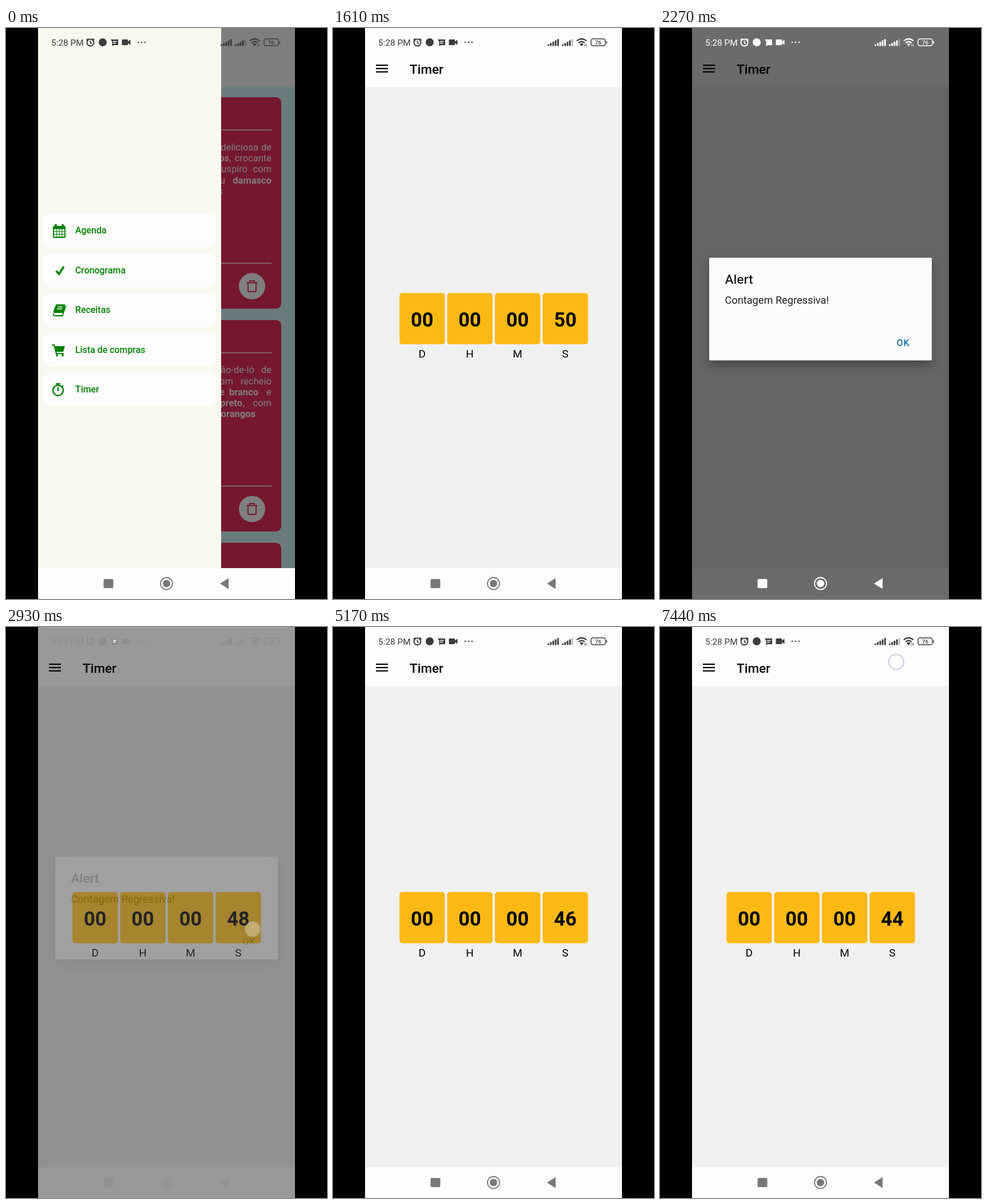
Write an HTML page that moves like this. It is 561 px wide and 998 px high and loops after 7480 ms.

```html
<!DOCTYPE html>
<html lang="pt">
<head>
<meta charset="utf-8">
<title>Timer</title>
<style>
  html, body { margin: 0; width: 100%; height: 100%; overflow: hidden; background: #000; }
  svg { display: block; width: 561px; height: 998px; font-family: Roboto, "Noto Sans", sans-serif; }
  .medium { font-weight: 500; }
  .bold { font-weight: 700; }
  .mid { text-anchor: middle; }
  .end { text-anchor: end; }
  .line { fill: none; stroke: currentColor; }
  .solid { fill: currentColor; }
</style>
</head>
<body>
<svg viewBox="0 0 561 998">
  <defs>
    <clipPath id="phone"><rect x="56" width="449" height="998"/></clipPath>
    <radialGradient id="ink" gradientUnits="userSpaceOnUse" cx="180" cy="630" r="215">
      <stop offset=".71" stop-color="#000"/>
      <stop offset="1" stop-color="#000" stop-opacity="0"/>
    </radialGradient>
    <filter id="shadow" x="-20%" y="-30%" width="140%" height="170%">
      <feDropShadow dx="0" dy="9" stdDeviation="10" flood-opacity=".3"/>
    </filter>
  </defs>
  <g clip-path="url(#phone)">
    <g id="recipes"></g>
    <g id="timer"></g>
    <rect id="scrim" x="56" width="449" height="944"/>
    <g id="drawer"></g>
    <rect x="56" y="944" width="449" height="54" fill="#fdfdfd"/>
    <rect id="dim" x="56" width="449" height="998"/>
    <g id="alert"></g>
    <g id="status"></g>
    <g id="nav"></g>
    <circle id="touch" r="13" fill="#fff" fill-opacity=".72" stroke="#bcc0da" stroke-width="1.6"/>
  </g>
</svg>
<script>
const LOOP = 7480;
const $ = id => document.getElementById(id);
const rect = (x, y, w, h, r, fill) =>
  `<rect x="${x}" y="${y}" width="${w}" height="${h}" rx="${r}" fill="${fill}"/>`;
const text = (x, y, size, str, cls = '', fill = '#000', extra = '') =>
  `<text x="${x}" y="${y}" font-size="${size}" class="${cls}" fill="${fill}" ${extra}>${str}</text>`;
const stroke = (d, w = 2) => `<path class="line" stroke-width="${w}" d="${d}"/>`;
const solid = d => `<path class="solid" d="${d}"/>`;

// Recipes screen
const trash = y => `<circle cx="430" cy="${y}" r="23" fill="#fff"/>
  <g color="#ec305c" transform="translate(430 ${y})">
  ${stroke('M-9.500 -6H9.500M-4 -6V-9.500H4V-6M-7 -6V8Q-7 9.500 -5.500 9.500H5.500Q7 9.500 7 8V-6')}</g>`;

const recipe = (y, lines) => rect(80, y, 401, 369.5, 9, '#ec305c') +
  rect(97, y + 56.5, 367, 1.4, 0, '#fff') + rect(97, y + 289.5, 367, 1.4, 0, '#fff') +
  lines.map((words, i) => words.map(([x, str, cls = '']) =>
    text(x, y + 93 + i * 19.2, 16.5, str, 'end ' + cls, '#fff')).join('')).join('') +
  trash(y + 330.3);

$('recipes').innerHTML = rect(56, 0, 449, 103, 0, '#fdfdfd') + rect(56, 103, 449, 841, 0, '#d6f8fb') +
  recipe(121, [
    [[441, 'deliciosa'], [464, 'de']],
    [[390, 'damascos', 'bold'], [393.5, ','], [464, 'crocante']],
    [[422, 'suspiro'], [464, 'com']],
    [[383, 'ou'], [464, 'damasco', 'bold']],
    [[379, 'frescos']]
  ]) +
  recipe(510.4, [
    [[434, 'pão-de-ló'], [464, 'de']],
    [[397, 'com'], [464, 'recheio']],
    [[382, 'chocolate', 'bold'], [441, 'branco', 'bold'], [464, 'e']],
    [[413, 'preto', 'bold'], [417, ','], [464, 'com']],
    [[436, 'morangos', 'bold']]
  ]) + recipe(899.8, []);

// Timer screen
const units = ['D', 'H', 'M', 'S'];
$('timer').innerHTML = rect(56, 0, 449, 103, 0, '#fdfdfd') + rect(56, 103, 449, 841, 0, '#f0f0f0') +
  [64, 69.8, 75.6].map(y => rect(75, y, 21, 2.2, 0, '#000')).join('') +
  text(134, 80, 22.5, 'Timer', 'medium') +
  units.map((u, i) => {
    const x = 116.2 + i * 83.4;
    return rect(x, 463.3, 79.2, 89.4, 5, '#fdb913') +
      text(x + 39.5, 522, 34.4, '00', 'mid bold', '#000', `id="count${u}"`) +
      text(x + 39.5, 575.5, 19, u, 'mid');
  }).join('');

// Drawer
const calendar = solid('M84 346H103Q104 346 104 348V365Q104 367 102 367H84Q82 367 82 365V348Q82 346 84 346Z') +
  rect(85, 342.5, 4, 7, 2, 'currentColor') + rect(97, 342.5, 4, 7, 2, 'currentColor') +
  [0, 1, 2].map(r => [0, 1, 2, 3].map(c =>
    rect(84 + c * 4.8, 351.5 + r * 4.8, 3.7, 3.7, 0, '#fff')).join('')).join('');
const icons = [
  calendar,
  stroke('M87.5 424.5L92.5 430L101 417', 3.6),
  solid('M88.5 483H102Q104 483 103.5 485L99.5 498H84Q82 498 82.5 496L86.5 485Q87 483 88.5 483Z') +
    stroke('M83 499Q82 503 85 503H98.5L104.5 486', 1.8) +
    `<path d="M90 487.500H99M89 491H98" stroke="#fff" stroke-width="1.4"/>`,
  solid('M84.5 556H103L100 566H87.5Z') + stroke('M80 554H84L88 569H101') +
    '<circle class="solid" cx="89" cy="572" r="2"/><circle class="solid" cx="99" cy="572" r="2"/>',
  '<circle class="line" cx="91" cy="633.500" r="9" stroke-width="2.4"/>' +
    stroke('M87 622H95M91 628V634.500M98 627L100 625', 2.4)
];
const labels = ['Agenda', 'Cronograma', 'Receitas', 'Lista de compras', 'Timer'];
$('drawer').innerHTML = rect(56, 0, 320, 944, 0, '#f8f8ee') +
  labels.map((label, i) => rect(65, 325.3 + i * 69.5, 302, 58, 12, '#fdfdfd') +
    text(121, 359 + i * 69.5, 15.9, label, 'medium', '#008000')).join('') +
  `<g color="#008000">${icons.join('')}</g>` +
  '<rect id="ripple" x="56" y="604" width="320" height="52" fill="url(#ink)"/>';

// Alert dialog
$('alert').innerHTML = `<g filter="url(#shadow)">${rect(86, 401.5, 389, 179.5, 2, '#fcfcfc')}</g>` +
  text(113.5, 447, 22.6, 'Alert', 'medium', '#212121') +
  text(113.5, 482, 18.2, 'Contagem Regressiva!', '', '#212121') +
  text(413.5, 555.5, 16, 'OK', 'medium', '#16719f', 'letter-spacing="1"');

// System bars
const bars = (x, strong) => [0, 1, 2, 3, 4].map(i =>
  `<rect class="solid" x="${x + i * 4.2}" y="${28.5 - i * 2.3}" width="2.9" height="${3 + i * 2.3}" rx="1"
   opacity="${i >= strong ? .35 : 1}"/>`).join('');
$('status').innerHTML = text(79, 31, 15.4, '5:28 PM', '', 'currentColor') +
  '<circle class="line" cx="147.500" cy="25.500" r="6" stroke-width="1.9"/>' +
  stroke('M147.5 22V26L150 27.5M140.5 21.5L144 18.5M154.5 21.5L151 18.5', 1.7) +
  '<circle class="solid" cx="169" cy="25" r="7"/>' +
  solid('M183 20H196V30H188L185.5 32V24Z') +
  '<path d="M187 23.500H193.500M187 26.500H192" stroke="#fdfdfd" stroke-width="1.3"/>' +
  solid('M203.5 20H212Q213 20 213 21V23.5L217.5 20.5V29.5L213 26.5V29Q213 30 212 30H203.5Q202.5 30 202.5 29V21Q202.5 20 203.5 20Z') +
  [231, 237, 243].map(x => `<circle class="solid" cx="${x}" cy="25" r="1.3"/>`).join('') +
  bars(375, 5) + bars(400, 4) +
  stroke('M426 22.5Q434.5 15.5 443 22.5M429 26Q434.5 21.5 440 26', 2.2) +
  solid('M431 28Q434.5 25.5 438 28L434.5 32Z') + stroke('M440 28V32M442.5 28V32', 1) +
  '<rect class="line" x="451" y="19" width="25" height="12" rx="3.500" stroke-width="1.500"/>' +
  rect(477.5, 23, 1.6, 4.5, .8, 'currentColor') +
  text(463.5, 28.6, 9.6, '76', 'mid medium', 'currentColor');
$('nav').innerHTML = rect(170.5, 963, 17, 16, 2.5, 'currentColor') +
  '<circle class="line" cx="280.500" cy="971" r="10.500" stroke-width="1.800"/>' +
  '<circle class="solid" cx="280.500" cy="971" r="6.500"/>' +
  solid('M374 971L389 961.5V980.5Z');

// Timeline
const ramp = (t, a, b) => Math.min(1, Math.max(0, (t - a) / (b - a)));
const pulse = (t, a, b, c, d) => ramp(t, a, b) * (1 - ramp(t, c, d));
const grey = (from, mix) => {
  const v = Math.round(from + (255 - from) * mix);
  return `rgb(${v},${v},${v})`;
};
const touches = [
  { x: 190, y: 631, at: [760, 800, 880, 940] },
  { x: 414, y: 519, at: [1980, 2020, 2160, 2220] },
  { x: 431, y: 528, at: [2740, 2780, 2870, 2980] },
  { x: 413, y: 61, at: [7370, 7410, 7480, 7481] }
];
const show = (id, opacity) => $(id).setAttribute('opacity', opacity);

function render(t) {
  const onTimer = t >= 940;
  $('recipes').style.display = onTimer ? 'none' : '';
  $('timer').style.display = onTimer ? '' : 'none';

  const open = (1 - ramp(t, 950, 1384)) ** 3;
  $('drawer').setAttribute('transform', `translate(${Math.round((open - 1) * 320)} 0)`);
  show('scrim', open * .5);
  $('ink').setAttribute('r', 40 + 175 * ramp(t, 840, 1070));
  show('ripple', .31 * pulse(t, 820, 860, 1080, 1300));

  const ticks = t < 1920 ? 0 : 1 + Math.floor((t - 1920) / 1005);
  $('countS').textContent = 50 - ticks;

  show('dim', .6 * pulse(t, 2050, 2280, 2850, 3090));
  show('alert', pulse(t, 2050, 2165, 2845, 2945));
  $('status').style.color = grey(60, pulse(t, 2050, 2165, 2860, 2980));
  $('nav').style.color = grey(120, pulse(t, 2050, 2175, 2850, 2950));

  const touch = touches.find(p => t >= p.at[0] && t < p.at[3]);
  show('touch', touch ? pulse(t, ...touch.at) : 0);
  if (touch) $('touch').setAttribute('transform', `translate(${touch.x} ${touch.y})`);
}

const start = performance.now();
function frame() {
  render((performance.now() - start) % LOOP);
  requestAnimationFrame(frame);
}
frame();
</script>
</body>
</html>
```
